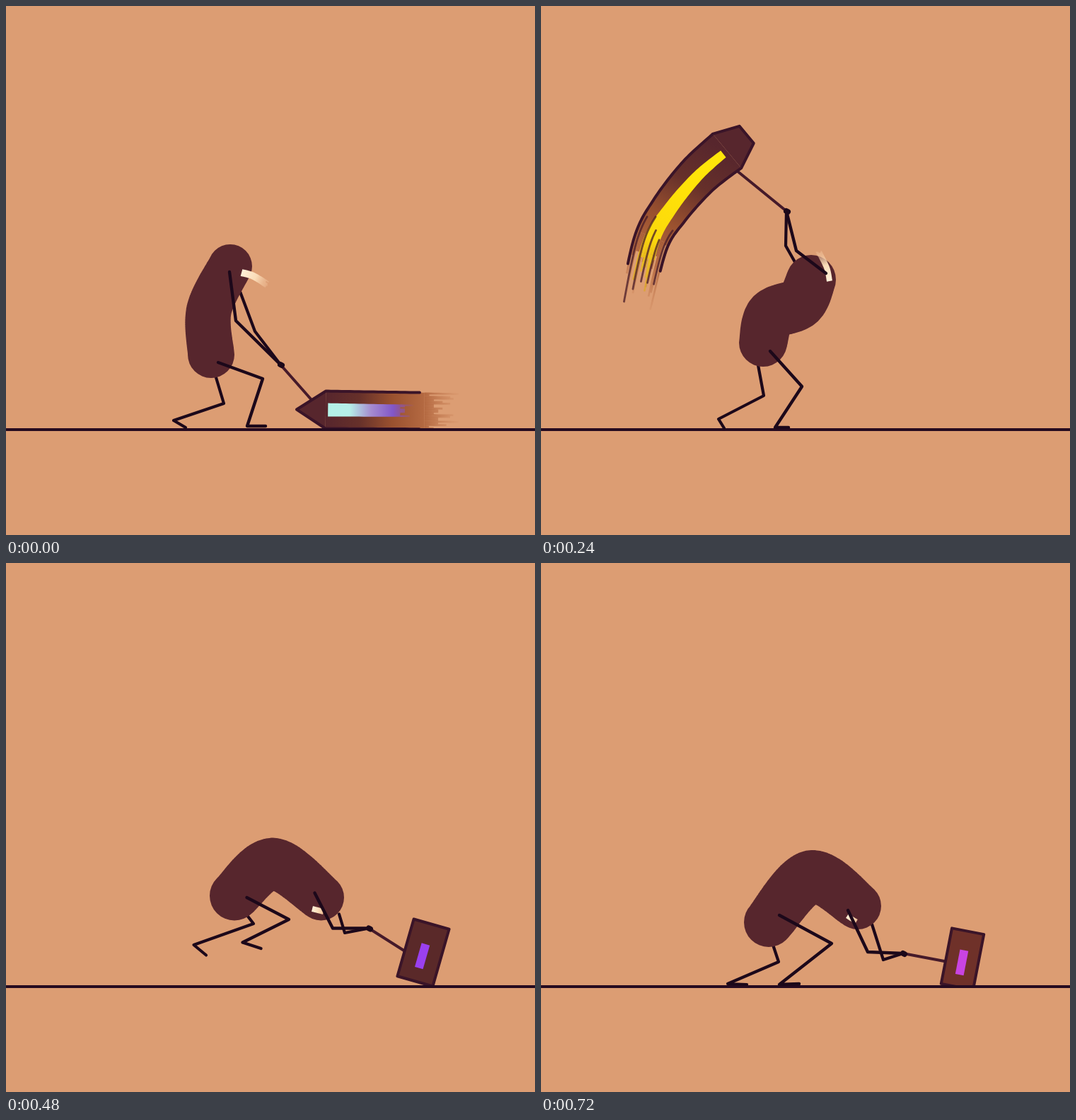
An HTML page with a canvas for the animation above (0.8 s loop, 748x748 px).

```html
<!DOCTYPE html>
<html lang="en">
<head>
<meta charset="utf-8">
<title>Hammer swing</title>
<style>
html, body { margin: 0; height: 100%; overflow: hidden; background: #dc9d73; }
canvas { display: block; width: 100vw; height: 100vh; }
</style>
</head>
<body>
<canvas id="stage" width="748" height="748"></canvas>
<script>
const ctx = document.getElementById('stage').getContext('2d');
const STEP = 80, SIZE = 748, GROUND = 599;
const SKY = '#dc9d73', SKIN = '#57262d', LIMB = '#1c081a', RIM = '#3a1428', GRIP = '#451a2a';
const WOOD = [SKIN, '#66302a', '#9a512f', '#b56a42', '#c9805518'];

const P = s => s.split(' ').map(p => p.split(',').map(Number));

// Body: spine from head to hip with three radii. Legs: hip, knee, ankle, toe.
const drag = {
  body: P('317,368 287,430 290,493'), r: [31, 32, 33],
  eye: P('333,377 350,382 371,395'), eyeW: 10, fade: .9,
  nearArm: P('316,376 325,445 388,507'), farArm: P('331,404 352,460'),
  nearLeg: P('300,504 363,527 341,594 367,594'), farLeg: P('296,522 308,562 237,586 254,596'),
  grip: [433, 558],
  smear: { line: P('452,571 545,572 640,573'), w: [53, 51], nose: 41, taper: 0, rim: .7, streaks: 0 },
  light: { w: [19, 17], to: .65, ink: ['#b4f3e8', '#b6efe8', '#a58bd0', '#8257c8', '#8a50c000'] }
};

const back = {
  body: P('280,322 306,390 293,463'), r: [32, 37, 36],
  eye: P('292,306 250,311 226,340'), eyeW: 10, fade: .9,
  nearArm: P('286,325 224,370 190,434'), farArm: P('262,350 223,392'),
  nearLeg: P('309,467 341,520 335,596 351,594'), farLeg: P('293,496 288,531 252,581 263,597'),
  grip: [130, 482],
  smear: { line: P('102,445 103,482 115,520 140,556 182,588'), w: [51, 42], nose: 0, taper: 1, rim: .74, streaks: 3 },
  light: { w: [9, 14], to: .88, ink: ['#ff5c12', '#ff5c10', '#ee8a18', '#ecc61c'] }
};

const lift = {
  body: P('382,387 366,420 325,437 314,476'), r: [35, 37, 34],
  eye: P('408,389 404,370 392,346'), eyeW: 8, fade: .8,
  nearArm: P('403,378 361,346 347,290'), farArm: P('359,362 346,339'),
  nearLeg: P('324,488 369,538 331,596 350,596'), farLeg: P('307,508 315,551 251,584 259,597'),
  grip: [277, 233],
  smear: { line: P('263,205 222,240 182,288 155,335 134,425'), w: [63, 44], nose: 36, taper: .5, rim: .84, streaks: 5 },
  light: { w: [12, 26], to: .93, ink: ['#ffe60a', '#ffe208', '#fbd80c', '#d8a028a0'] }
};

const swing = {
  body: P('445,480 385,458 345,468 311,495'), r: [37, 39, 38],
  eye: P('455,504 460,490 462,476'), eyeW: 9, fade: .3,
  nearArm: P('433,476 444,427 491,406'), farArm: P('453,444 458,430'),
  nearLeg: P('322,513 410,560 332,590 350,596'), farLeg: P('315,539 327,568 251,593 266,596'),
  grip: [530, 351],
  smear: { line: P('553,336 500,289 430,247 310,213 226,232 168,280 128,338'), w: [54, 57], nose: 29, taper: .6, rim: .77, streaks: 5 },
  light: { w: [15, 21], to: .81, ink: ['#743ce8', '#a9b4ee', '#b9ebe5', '#b6e6d4', '#a9cf63', '#f5dc20', '#fbdc0c', '#ecc01c'] }
};

const slam = {
  body: P('450,463 380,415 329,450'), r: [33, 37, 35],
  eye: P('437,479 445,481 452,483'), eyeW: 9, fade: 0,
  nearArm: P('439,457 463,507 513,507'), farArm: P('478,485 489,501'),
  nearLeg: P('336,453 393,487 330,506 355,516'), farLeg: P('350,476 358,483 268,524 292,532'),
  grip: [565, 547],
  smear: { line: P('583,598 586,572 606,510 610,440 580,380'), w: [56, 24], flare: 92, nose: 0, taper: 1, rim: .82, streaks: 4 },
  light: { w: [27, 11], to: .88, ink: ['#8d50f2', '#cf42e6', '#dc3be0', '#e04edb', '#d9649890'] }
};

const settle = {
  body: P('441,483 375,436 317,491'), r: [32, 37, 35],
  eye: P('429,499 437,501 446,503'), eyeW: 7, fade: 0,
  nearArm: P('434,476 461,526 513,526'), farArm: P('464,508 469,545'),
  nearLeg: P('345,493 407,521 339,567 366,574'), farLeg: P('333,522 342,537 263,556 274,577'),
  grip: [565, 552],
  block: { x: 584, y: 556, w: 52, h: 84, turn: 24, ink: '#5a2929', glow: '#7a28f0' }
};

const rest = {
  body: P('448,485 382,444 322,508'), r: [33, 38, 35],
  eye: P('433,499 439,503 446,507'), eyeW: 7, fade: 0,
  nearArm: P('434,491 462,550 512,552'), farArm: P('468,511 484,561'),
  nearLeg: P('337,498 411,538 337,596 365,595'), farLeg: P('328,540 336,564 264,595 291,596'),
  grip: [570, 563],
  block: { x: 596, y: 560, w: 46, h: 80, turn: 11, ink: '#6f3129', glow: '#c944e2' }
};

// Blends numbers at any depth; anything else comes from b.
function mix(a, b, t) {
  if (a === undefined) return b;
  if (typeof b === 'number') return a + (b - a) * t;
  if (Array.isArray(b)) return b.map((v, i) => mix(a[i], v, t));
  if (typeof b !== 'object') return b;
  return Object.fromEntries(Object.entries(b).map(([k, v]) => [k, mix(a[k], v, t)]));
}

const pull = {
  ...mix(drag, back, .5), grip: [214, 548],
  smear: { ...drag.smear, line: P('227,571 320,572 414,573') },
  light: { ...drag.light, ink: ['#f2d81c', '#c8d850', '#a9dcae', '#b0e0d000'] }
};
const recoil = {
  ...mix(slam, settle, .5),
  block: { ...settle.block, x: 590, y: 551, turn: 16, glow: '#9a40ee' }
};
const land = mix(settle, rest, .6);
land.block = { ...land.block, x: 597, turn: 21, glow: '#a63aea' };

const poses = [drag, pull, back, lift, swing, slam, recoil, settle, land, rest];

let seed;
const rnd = () => (seed = seed * 16807 % 2147483647) / 2147483647;

function path(points) {
  const p = new Path2D();
  points.forEach(q => p.lineTo(...q));
  return p;
}

function stroke(points, width, color, cap = 'round') {
  ctx.lineCap = cap;
  ctx.lineJoin = 'round';
  ctx.lineWidth = width;
  ctx.strokeStyle = color;
  ctx.stroke(path(points));
}

function fill(points, color) {
  ctx.fillStyle = color;
  ctx.fill(path(points));
}

// Points along a Catmull-Rom curve.
function curve(p, per = 16) {
  const last = p.length - 1, out = [];
  for (let k = 0; k <= last * per; k++) {
    const i = Math.min(last - 1, Math.floor(k / per)), t = k / per - i;
    const a = p[Math.max(0, i - 1)], b = p[i], c = p[i + 1], d = p[Math.min(last, i + 2)];
    out.push([0, 1].map(j => {
      const v = (c[j] - a[j]) / 2, w = (d[j] - b[j]) / 2, s = c[j] - b[j];
      return b[j] + t * (v + t * (3 * s - 2 * v - w + t * (v + w - 2 * s)));
    }));
  }
  return out;
}

// Part of a line, moved sideways by off times its width.
function edge(line, width, off, from, to) {
  const m = line.length - 1, out = [];
  for (let i = Math.round(from * m); i <= Math.round(to * m); i++) {
    const a = line[Math.max(0, i - 1)], b = line[Math.min(m, i + 1)];
    const dx = b[0] - a[0], dy = b[1] - a[1], d = off * width(i / m) / (Math.hypot(dx, dy) || 1);
    out.push([line[i][0] - dy * d, line[i][1] + dx * d]);
  }
  return out;
}

// Solid ribbon that frays into bristles of uneven length.
function brush(line, width, ink, fray) {
  const grad = ctx.createLinearGradient(...line[0], ...line.at(-1)), solid = 1 - fray;
  ink.forEach((c, i) => grad.addColorStop(i / (ink.length - 1), c));
  fill([...edge(line, width, -.5, 0, solid), ...edge(line, width, .5, 0, solid).reverse()], grad);
  const n = fray ? Math.round(width(1) / 2.5) + 2 : 0;
  for (let k = 0; k < n; k++) {
    const off = (k + .5) / n - .5;
    stroke(edge(line, width, off, solid, 1 - rnd() * fray), width(1) / n * 1.2, grad, 'butt');
  }
}

function drawSmear({ line, w, flare = 0, nose, taper, rim, streaks }, light) {
  const spine = curve(line), m = spine.length - 1;
  const width = u => w[0] + (w[1] - w[0]) * u + flare * Math.exp(-u / .08);
  const left = edge(spine, width, -.5, 0, rim), right = edge(spine, width, .5, 0, rim);
  const [a, b] = spine, len = Math.hypot(a[0] - b[0], a[1] - b[1]);
  const tip = side => [0, 1].map(j => a[j] + (side[0][j] - a[j]) * taper + (a[j] - b[j]) / len * nose);
  const cap = [left[0], tip(left), tip(right), right[0]];

  fill(cap, SKIN);
  brush(spine, width, WOOD, .28);
  const glow = spine.slice(Math.round(m * .04), Math.round(m * light.to) + 1);
  brush(glow, u => light.w[0] + (light.w[1] - light.w[0]) * u, light.ink, .15);
  stroke([...left.reverse(), ...cap, ...right], 4, RIM);
  for (let k = 0; k < streaks; k++) {
    const off = (k + .5) / streaks - .5, from = rim - .1 - rnd() * .15;
    stroke(curve(edge(spine, width, off, from, rim + rnd() * (1 - rim)), 1), 2.8, '#4a1c28c0');
  }
}

function drawBlock({ x, y, w, h, turn, ink, glow }) {
  const box = (bw, bh, dy) => [[-1, -1], [1, -1], [1, 1], [-1, 1], [-1, -1]].map(p => [p[0] * bw / 2, p[1] * bh / 2 + dy]);
  ctx.save();
  ctx.beginPath();
  ctx.rect(0, 0, SIZE, GROUND);
  ctx.clip();
  ctx.translate(x, y);
  ctx.rotate(turn * Math.PI / 180);
  fill(box(w, h, 0), ink);
  fill(box(12, 35, 5), glow);
  stroke(box(w, h, 0), 4, RIM);
  ctx.restore();
}

function drawBody(spine, r) {
  const line = curve(spine, 24), shape = new Path2D();
  line.forEach(([x, y], i) => {
    const u = 2 * i / (line.length - 1), k = u < 1 ? 0 : 1;
    shape.moveTo(x, y);
    shape.arc(x, y, r[k] + (r[k + 1] - r[k]) * (u - k), 0, 7);
  });
  ctx.fillStyle = SKIN;
  ctx.fill(shape);
}

function draw(p) {
  seed = 7;
  const hand = p.nearArm.at(-1);
  ctx.fillStyle = SKY;
  ctx.fillRect(0, 0, SIZE, SIZE);
  stroke([hand, p.grip], 4, GRIP);
  if (p.block) drawBlock(p.block);
  else drawSmear(p.smear, p.light);
  stroke([[-5, GROUND], [SIZE + 5, GROUND]], 4, '#260b20');
  stroke(p.farLeg, 4.2, LIMB);
  stroke([...p.farArm, hand], 4.2, LIMB);
  drawBody(p.body, p.r);
  brush(curve(p.eye), () => p.eyeW, ['#fff0d8', '#fadcb8', `rgba(240, 190, 150, ${1 - p.fade * .8})`], p.fade * .2);
  stroke(p.nearLeg, 4.4, LIMB);
  stroke(p.nearArm, 4.4, LIMB);
  stroke([hand, [hand[0] + 2, hand[1] + 1]], 8, LIMB);
}

let shown = -1;
function tick() {
  const i = Math.floor(performance.now() / STEP) % poses.length;
  if (i !== shown) draw(poses[shown = i]);
  requestAnimationFrame(tick);
}
tick();
</script>
</body>
</html>
```
